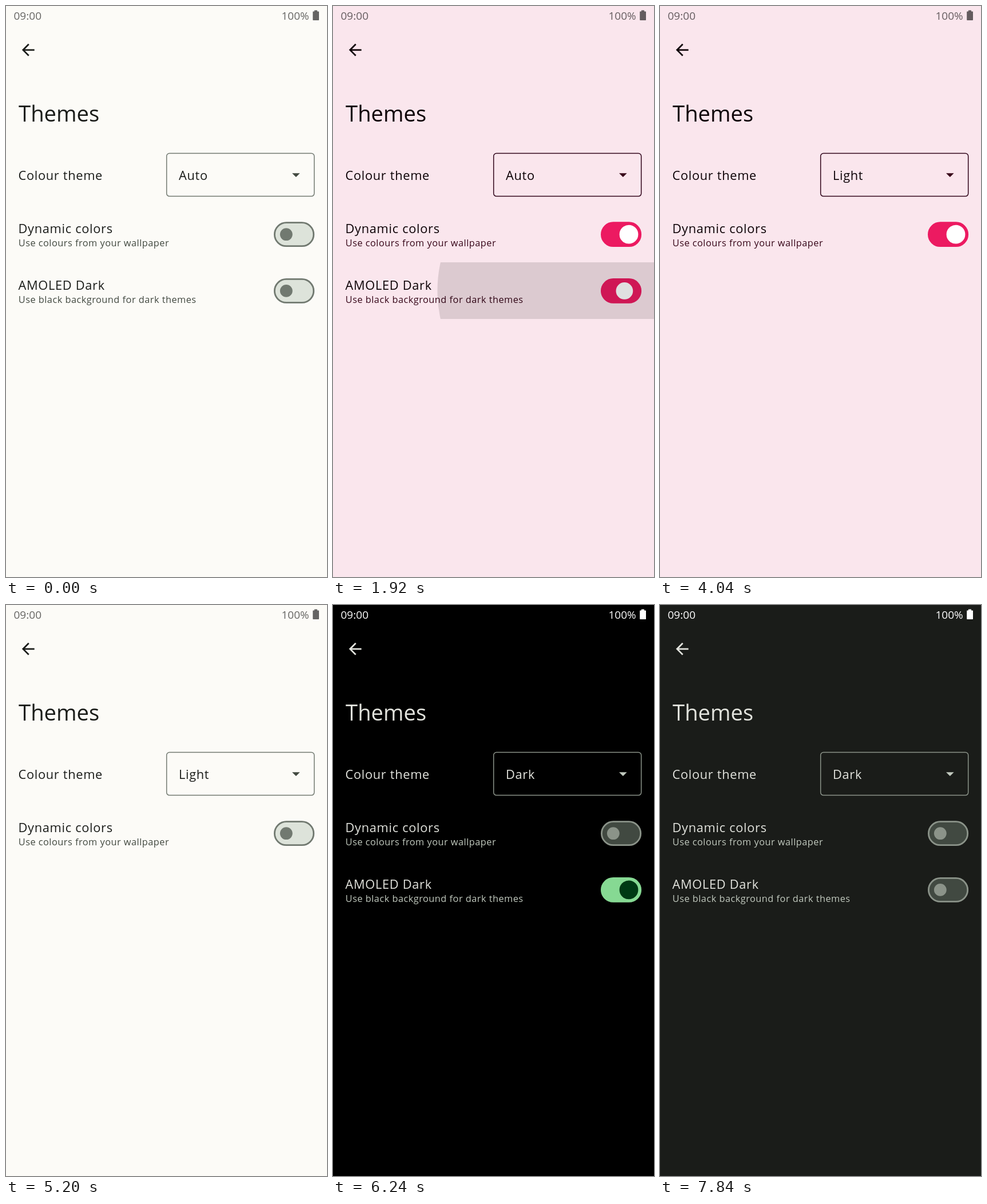
An HTML page for the animation above (8000 ms loop, 561 by 998 pixels).

```html
<!DOCTYPE html>
<html lang="en">
<head>
<meta charset="utf-8">
<title>Themes</title>
<style>
  html, body { margin: 0; width: 100%; height: 100%; overflow: hidden; }
  svg { display: block; font-family: "Open Sans", "Noto Sans", sans-serif; }
  #stage { width: 100%; height: 100%; background: var(--bg); }
  .title { font-size: 38.2px; fill: var(--text); }
  .label { font-size: 21.8px; letter-spacing: .68px; fill: var(--text); }
  .hint { font-size: 16.36px; letter-spacing: .46px; fill: var(--sub); }
  .item { font-size: 19.1px; font-weight: 500; letter-spacing: .14px; fill: var(--text); }
  .status { font-size: 19px; }
  .box { fill: none; stroke: var(--line); stroke-width: 1.5; }
  .menu { fill: var(--menu); filter: drop-shadow(0 2px 1.5px rgba(0, 0, 0, .25)); }
  .track { fill: var(--track); stroke: var(--line); stroke-width: 2.8; }
  .thumb { fill: var(--line); }
  .on .track { fill: var(--main); stroke: var(--main); }
  .on .thumb { fill: var(--knob); }
</style>
</head>
<body>
<svg id="stage" viewBox="0 0 561 998">
  <g id="status" class="status">
    <text x="13.5" y="24">09:00</text>
    <text x="481.5" y="24">100%</text>
    <path d="M539 7.5h5v2h2.2q.8 0 .8 .8v13.900q0 .8-.8 .8h-9.200q-.8 0-.8-.8v-13.900q0-.8 .8-.8h1.800z"/>
  </g>
  <path fill="var(--text)" transform="translate(22.4 60.4) scale(1.364)"
    d="M20 11H7.830l5.590-5.590L12 4l-8 8 8 8 1.410-1.410L7.830 13H20z"/>
  <text class="title" x="22" y="202">Themes</text>

  <text class="label" x="21.500" y="303.500">Colour theme</text>
  <rect class="box" x="280.700" y="257.600" width="258" height="75" rx="5"/>
  <text class="label" id="value" x="302" y="303.500"></text>
  <path id="caret" fill="var(--sub)" d="M-6.800-2.700H6.800L0 4.100z"/>

  <text class="label" x="21.500" y="396.500">Dynamic colors</text>
  <text class="hint" x="21.800" y="420">Use colours from your wallpaper</text>
  <g id="dynamic" transform="translate(468 377.300)">
    <rect class="track" x="1.400" y="1.400" width="68.300" height="41" rx="20.500"/>
    <circle class="thumb" cy="21.900"/>
  </g>

  <svg id="row" y="448" width="561" height="99">
    <g id="rowBody">
      <text class="label" x="21.500" y="47.500">AMOLED Dark</text>
      <text class="hint" x="21.800" y="71">Use black background for dark themes</text>
      <g id="amoled" transform="translate(468 28)">
        <rect class="track" x="1.400" y="1.400" width="68.300" height="41" rx="20.500"/>
        <circle class="thumb" cy="21.900"/>
      </g>
    </g>
  </svg>

  <svg id="ripple" width="561"><circle fill="var(--ripple)"/></svg>

  <g id="menu">
    <rect class="menu" x="280" y="333.500" width="259.500" height="217.500" rx="5.500"/>
    <text class="item" x="296.500" y="384.500">Auto</text>
    <text class="item" x="296.500" y="450">Light</text>
    <text class="item" x="296.500" y="515.500">Dark</text>
  </g>
</svg>
<script>
const LOOP = 8000;
const $ = id => document.getElementById(id);
const set = (el, attrs) => { for (const k in attrs) el.setAttribute(k, attrs[k]); };
const stage = $('stage');

const light = { bg: '#fcfbf7', text: '#1a1c19', sub: '#424940', line: '#717970', track: '#dde3da',
  main: '#126d34', knob: '#ffffff', menu: '#edf2e8', ripple: '#000000' };
const pink = { bg: '#fae6ed', text: '#0d0206', sub: '#38081a', line: '#30041a', track: '#f5cbdb',
  main: '#ec1a61', knob: '#ffffff', menu: '#fad3e2', ripple: '#000000' };
const black = { bg: '#000000', text: '#e2e3dd', sub: '#c1c9be', line: '#8b9389', track: '#414941',
  main: '#86d993', knob: '#003914', menu: '#20251f', ripple: '#e2e3dd' };
const dark = { ...black, bg: '#1a1c19' };

// Times in ms
const themes = [[0, light], [1260, pink], [4090, light], [5889, black], [7320, dark]];
const values = [[0, 'Auto'], [3370, 'Light'], [5850, 'Dark']];
const menus = [[2730, 3370], [5250, 5845]];
const ripples = [[1846, 475, 448, 99], [2715, 410, 240, 110], [5235, 410, 240, 110], [7300, 475, 448, 99]];
const THEME_MS = 340, CARET_MS = 300;

const clamp = v => Math.min(1, Math.max(0, v));
const span = (t, start, ms) => clamp((t - start) / ms);

// cubic-bezier(.4, 0, .2, 1)
function ease(x) {
  if (x <= 0 || x >= 1) return clamp(x);
  let lo = 0, hi = 1, s = .5;
  for (let i = 0; i < 20; i++) {
    s = (lo + hi) / 2;
    const at = 1.2 * (1 - s) ** 2 * s + .6 * (1 - s) * s * s + s ** 3;
    if (at < x) lo = s; else hi = s;
  }
  return 3 * (1 - s) * s * s + s ** 3;
}
const eased = (t, start, ms) => ease(span(t, start, ms));
const lastIndex = (list, t) => list.findLastIndex(e => t >= e[0]);

function drawTheme(t) {
  const i = lastIndex(themes, t), [start, to] = themes[i];
  const from = themes[Math.max(0, i - 1)][1];
  const p = 100 * eased(t, start, THEME_MS);
  for (const key in to)
    stage.style.setProperty('--' + key, `color-mix(in oklab, ${from[key]}, ${to[key]} ${p.toFixed(2)}%)`);
  const s = span(t, 5980, 120);
  set($('status'), { fill: `rgba(${[255, 255, 255].map(c => Math.round(c * s))},${.6 + .4 * s})` });
}

function drawSwitch(id, t, on, off) {
  const p = eased(t, on, 100) - eased(t, off, 100);
  const el = $(id);
  el.classList.toggle('on', t >= on && t < off);
  set(el.querySelector('.thumb'), { cx: 21.8 + 27.2 * p, r: 10.9 + 5.5 * p });
}

function drawMenu(t) {
  let alpha = 0, scale = 1, turn = 0;
  for (const [open, close] of menus) {
    turn += eased(t, open, CARET_MS) - eased(t, close + 80, CARET_MS);
    if (t < open) continue;
    alpha = span(t, open, 30) * (1 - span(t, close, 75));
    scale = .8 + .2 * eased(t, open, 120);
  }
  set($('caret'), { transform: `translate(506.800 295) rotate(${180 * turn})` });
  set($('menu'), { opacity: alpha, transform: `translate(410 333) scale(${scale}) translate(-410 -333)` });
}

function drawRow(t) {
  const p = 1 - eased(t, 3440, 300) + eased(t, 5975, 260);
  set($('row'), { height: 99 * p });
  set($('rowBody'), { opacity: p, transform: `translate(0 ${-99 * (1 - p)})` });
}

function drawRipple(t) {
  const [start, x, y, h] = ripples[Math.max(0, lastIndex(ripples, t))];
  const p = span(t, start, 225);
  const end = Math.hypot(561, h) / 2 + 13.7;
  set($('ripple'), { y, height: h });
  set($('ripple').firstChild, {
    cx: x + (280.5 - x) * p, cy: h / 2, r: 168 + (end - 168) * ease(p),
    opacity: .12 * span(t, start, 75) * (1 - span(t, start + 225, 150))
  });
}

function draw(t) {
  drawTheme(t);
  $('value').textContent = values[lastIndex(values, t)][1];
  drawSwitch('dynamic', t, 1250, 4060);
  drawSwitch('amoled', t, 1875, 7310);
  drawRow(t);
  drawRipple(t);
  drawMenu(t);
}

const begin = performance.now();
function tick() {
  draw((performance.now() - begin) % LOOP);
  requestAnimationFrame(tick);
}
tick();
</script>
</body>
</html>
```
